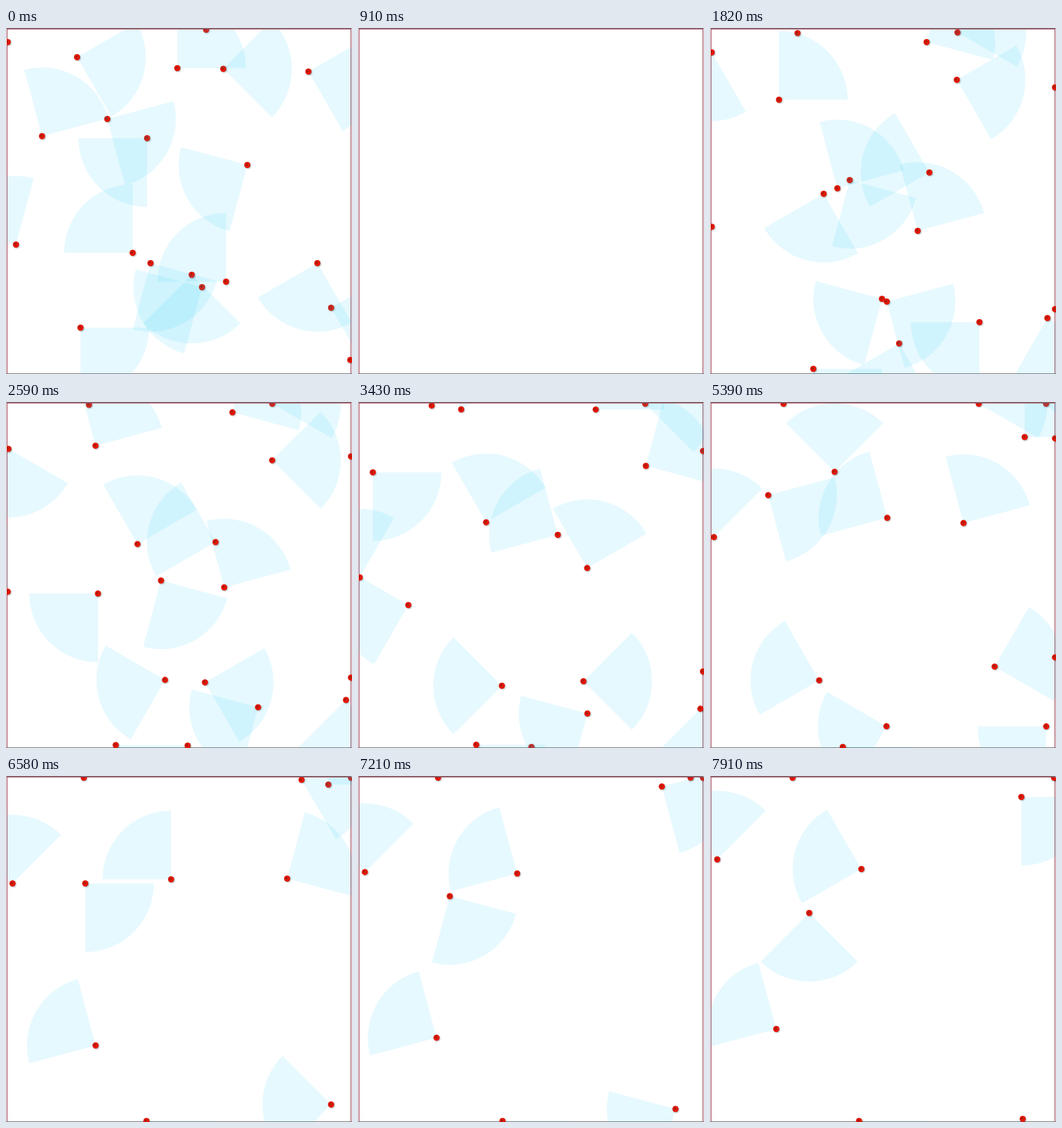
Animation, 504 px wide and 504 px high, one loop 8 s. Source, as an HTML page with a canvas:

```html
<!DOCTYPE html>
<html>
<head>
<meta charset="utf-8">
<style>
html, body { margin: 0; width: 100%; height: 100%; overflow: hidden; background: #fff; }
canvas { display: block; }
</style>
</head>
<body>
<canvas id="stage" width="504" height="504"></canvas>
<script>
const ctx = document.getElementById('stage').getContext('2d');
const LOOP = 8000, TICK = 70, LAST = 113, BLANK = 13;
const KEYS = [0, 26, 62, 94, LAST];
const UNIT = Math.PI / 12; // headings turn in steps of 15 degrees
const VIEW = 100, DOT = 5, STAYS = Infinity;

const walkers = [];
// end: tick at which the walker vanishes; poses: [x, y, heading] at the first KEYS
const walker = (end, ...poses) => walkers.push({ end, poses });

walker(STAYS, [291, 2, -6], [360, 6, -1], [451, 2, 0]);
walker(88, [440, 63, 1], [502, 86, -1]);
walker(STAYS, [316, 59, 0], [359, 75, 1], [447, 84, -3], [469, 12, -3]);
walker(STAYS, [249, 58, -3], [315, 20, -2], [361, 2, -3], [430, 5, 1], [453, 30, 3]);
walker(50, [205, 160, 9], [165, 241, 7], [5, 290, -11]);
walker(103, [320, 369, -9], [302, 295, -4], [346, 209, -5], [409, 149, -2]);
walker(48, [147, 132, 2], [203, 221, 4]);
walker(80, [184, 327, -9], [185, 233, -4], [181, 140, -6]);
walker(STAYS, [351, 199, 10], [319, 210, -11], [275, 182, -10], [240, 150, -9], [220, 135, -11]);
walker(76, [270, 359, 6], [275, 459, 7]);
walker(STAYS, [285, 377, 10], [250, 394, 10], [185, 413, -11], [130, 392, -10], [96, 368, -10]);
walker(84, [210, 342, 4], [257, 398, 2], [369, 397, -1]);
walker(STAYS, [473, 407, 1], [491, 422, 5], [498, 460, 7], [473, 478, 12], [455, 499, 7]);
walker(78, [453, 342, 7], [392, 428, 9], [297, 461, 11]);
walker(STAYS, [2, 20, 12], [2, 35, 7], [53, 124, 1], [115, 156, 3], [144, 199, 6]);
walker(STAYS, [103, 42, 1], [127, 7, -6], [101, 2, -4]);
walker(70, [52, 157, -4], [100, 104, -3], [157, -50, -6]);
walker(STAYS, [14, 315, -8], [2, 289, -10], [2, 232, -6], [9, 156, -6], [10, 121, -6]);
walker(STAYS, [108, 436, 3], [150, 496, 3], [183, 502, 3]);
walker(88, [501, 483, 0], [502, 409, -1]);

const clamp = v => Math.max(2, Math.min(502, v));

// Hermite path whose tangents follow the headings; straight on after the last pose
function poseAt(poses, tick) {
  let i = 0;
  while (i < poses.length - 2 && tick > KEYS[i + 1]) i++;
  const [x0, y0, h0] = poses[i], [x1, y1, h1] = poses[i + 1];
  const u = (tick - KEYS[i]) / (KEYS[i + 1] - KEYS[i]);
  const reach = Math.hypot(x1 - x0, y1 - y0);
  const a = h0 * UNIT, b = h1 * UNIT;
  if (u > 1) {
    const d = reach * (u - 1);
    return [clamp(x1 + d * Math.cos(b)), clamp(y1 + d * Math.sin(b)), h1];
  }
  const s = u * u * (3 - 2 * u), p = u * (1 - u) ** 2 * reach, q = u * u * (u - 1) * reach;
  const turn = (h1 - h0 + 36) % 24 - 12;
  return [
    clamp(x0 + (x1 - x0) * s + p * Math.cos(a) + q * Math.cos(b)),
    clamp(y0 + (y1 - y0) * s + p * Math.sin(a) + q * Math.sin(b)),
    h0 + Math.round(turn * u)
  ];
}

function drawWalker([x, y, h]) {
  ctx.fillStyle = 'rgba(15, 190, 245, 0.1)';
  ctx.beginPath();
  ctx.moveTo(x, y);
  ctx.arc(x, y, VIEW, (h - 3) * UNIT, (h + 3) * UNIT);
  ctx.fill();

  const ball = ctx.createRadialGradient(x - 1.5, y - 1, 0, x, y, DOT);
  ball.addColorStop(0, '#8c1c14');
  ball.addColorStop(0.6, '#ee1806');
  ball.addColorStop(1, '#d01408');
  ctx.save();
  ctx.shadowColor = 'rgba(0, 0, 0, 0.3)';
  ctx.shadowBlur = 2;
  ctx.shadowOffsetX = ctx.shadowOffsetY = 1;
  ctx.fillStyle = ball;
  ctx.beginPath();
  ctx.arc(x, y, DOT - 0.5, 0, 2 * Math.PI);
  ctx.fill();
  ctx.restore();
}

function drawBorder() {
  ctx.fillStyle = '#96384c';
  ctx.fillRect(1, 1, 502, 1);
  ctx.fillRect(1, 1, 1, 502);
  ctx.fillRect(502, 1, 1, 502);
  ctx.fillStyle = '#808080';
  ctx.fillRect(0, 0, 504, 1);
  ctx.fillRect(0, 503, 504, 1);
}

function draw(now) {
  let tick = Math.min(LAST, Math.floor(now % LOOP / TICK));
  if (tick && tick % 9 === 0) tick--; // a regular stutter
  ctx.fillStyle = '#fff';
  ctx.fillRect(0, 0, 504, 504);
  drawBorder();
  if (tick === BLANK) return;
  ctx.save();
  ctx.beginPath();
  ctx.rect(1, 2, 503, 502);
  ctx.clip();
  ctx.translate(0.5, 0.5);
  for (const w of walkers) if (tick < w.end) drawWalker(poseAt(w.poses, tick));
  ctx.restore();
}

const start = performance.now();
function loop() {
  draw(performance.now() - start);
  requestAnimationFrame(loop);
}
loop();
</script>
</body>
</html>
```
